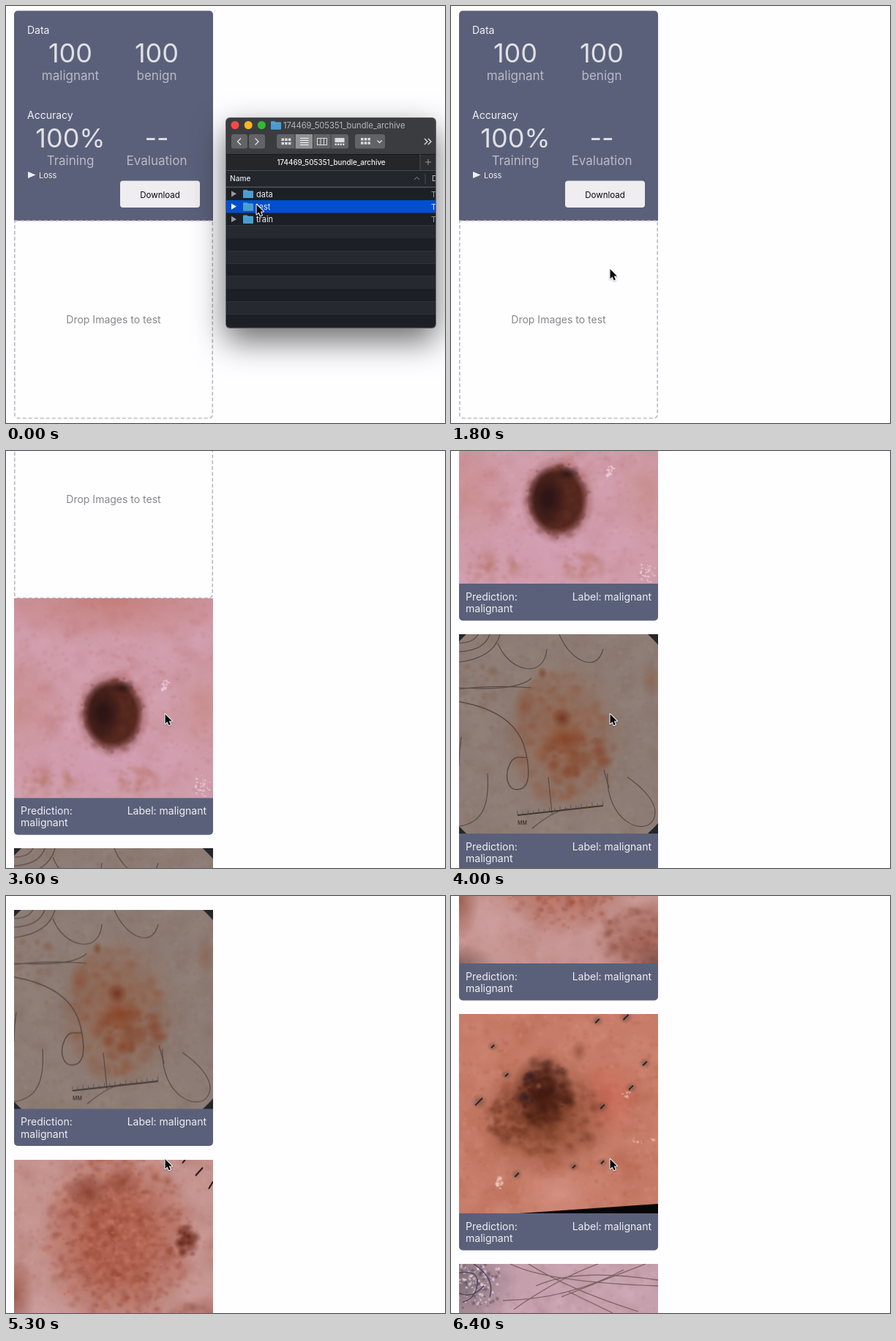
Write an HTML page with a canvas that moves like this. It is 600x569 px and loops after 6.5 s.

```html
<!DOCTYPE html>
<html lang="en">
<head>
<meta charset="utf-8">
<title>Image classifier</title>
<style>
html, body { margin: 0; width: 100%; height: 100%; overflow: hidden; background: #fefdff; }
canvas { display: block; }
</style>
</head>
<body>
<canvas id="stage" width="600" height="569"></canvas>
<script>
const LOOP = 6500, STEP = 100;
const LEFT = 11, WIDTH = 272, FIRST_CARD = 563, CARD_PITCH = 341;
const SLATE = '#5b607a';
const stage = document.getElementById('stage').getContext('2d');

let g = stage;   // current drawing context

function box(x, y, w, h, fill, radius = 0) {
  g.fillStyle = fill;
  g.beginPath();
  g.roundRect(x, y, w, h, radius);
  g.fill();
}

function shape(points, fill) {
  g.fillStyle = fill;
  g.beginPath();
  points.forEach(([x, y]) => g.lineTo(x, y));
  g.closePath();
  g.fill();
}

function line(points, color, width = 1) {
  g.strokeStyle = color;
  g.lineWidth = width;
  g.beginPath();
  points.forEach(([x, y]) => g.lineTo(x, y));
  g.stroke();
}

function text(str, x, y, size, color, align = 'left', weight = 400) {
  g.font = `${weight} ${size}px Inter, sans-serif`;
  g.textAlign = align;
  g.fillStyle = color;
  g.fillText(str, x, y);
}

/* ---------- skin pictures ---------- */

function seeded(seed) {
  seed *= 7919;
  return () => (seed = (seed * 16807) % 2147483647) / 2147483647;
}

// Soft ellipse; rgb is "r,g,b", core is the solid share of the radius.
function blob(x, y, rx, ry, rgb, alpha = 1, core = 0) {
  const fade = g.createRadialGradient(0, 0, core, 0, 0, 1);
  fade.addColorStop(0, `rgba(${rgb},${alpha})`);
  fade.addColorStop(1, `rgba(${rgb},0)`);
  g.save();
  g.translate(x, y);
  g.scale(rx, ry);
  g.fillStyle = fade;
  g.fillRect(-1, -1, 2, 2);
  g.restore();
}

// Random soft spots inside an ellipse, denser towards its middle.
function mottle(seed, count, x, y, rx, ry, size, rgb, alpha) {
  const rnd = seeded(seed);
  for (let i = 0; i < count; i++) {
    const a = rnd() * 2 * Math.PI, d = rnd() ** 0.6, r = size * (0.4 + rnd());
    blob(x + Math.cos(a) * d * rx, y + Math.sin(a) * d * ry, r, r * (0.6 + rnd() * 0.6), rgb, alpha);
  }
}

// Fine and coarse texture over the whole picture.
function skin(seed, base, dark, light) {
  box(0, 0, WIDTH, WIDTH, base);
  mottle(seed, 130, 136, 136, 195, 195, 18, dark, 0.22);
  mottle(seed + 1, 130, 136, 136, 195, 195, 18, light, 0.24);
  mottle(seed + 2, 500, 136, 136, 195, 195, 4.5, dark, 0.25);
  mottle(seed + 3, 500, 136, 136, 195, 195, 4.5, light, 0.25);
}

function hair(path, color, width = 1.2) {
  g.strokeStyle = color;
  g.lineWidth = width;
  g.stroke(new Path2D(path));
}

function pinkMole() {
  skin(1, '#d09caa', '190,120,122', '218,170,192');
  blob(136, 0, 200, 65, '194,120,112', 0.8);
  blob(10, 150, 60, 80, '196,136,128', 0.6);
  blob(262, 150, 50, 70, '196,136,126', 0.6);
  blob(130, 225, 130, 50, '210,156,182', 0.5);
  mottle(5, 30, 44, 250, 38, 18, 9, '176,108,84', 0.25);
  mottle(6, 30, 168, 247, 30, 18, 9, '176,108,84', 0.25);
  blob(135, 158, 52, 61, '130,62,56', 0.75, 0.5);
  blob(135, 158, 42, 50, '82,38,30', 1, 0.75);
  mottle(3, 110, 135, 158, 44, 53, 7, '100,46,32', 0.35);
  blob(121, 156, 28, 44, '40,18,20', 0.85, 0.2);
  blob(148, 122, 17, 10, '42,20,18', 0.8);
  mottle(8, 10, 207, 119, 6, 9, 3, '250,225,238', 0.8);
  mottle(4, 34, 257, 256, 14, 15, 2.2, '240,214,228', 0.8);
}

function hairyPatch() {
  skin(10, '#8d7c75', '128,104,94', '152,138,128');
  blob(144, 140, 86, 112, '146,90,62', 0.75);
  mottle(17, 150, 138, 140, 66, 88, 11, '140,74,44', 0.2);
  mottle(18, 50, 165, 165, 52, 27, 11, '130,58,30', 0.26);
  blob(141, 115, 15, 15, '112,48,26', 0.85);
  blob(114, 53, 7, 9, '125,62,36', 0.7);
  blob(89, 95, 15, 25, '138,72,42', 0.55);
  blob(262, 62, 14, 26, '138,85,58', 0.5);
  mottle(19, 28, 25, 72, 38, 34, 8, '130,88,66', 0.25);
  const strand = '#574a45';
  hair('M0 92C45 100 82 120 91 160S92 212 79 212S62 193 69 178S84 170 93 168', strand, 1.5);
  hair('M53 12C68 52 117 62 120 20M137 0C150 34 188 56 197 20', strand);
  hair('M0 75Q45 69 99 73M0 73Q80 78 99 60M0 38Q48 32 56 0M0 24Q35 22 42 0M0 12Q20 12 26 0', strand);
  hair('M203 190C200 255 252 276 265 254S245 205 230 195M39 190C42 240 28 258 0 262', strand);
  hair('M122 195L127 245M198 185L205 210M3 140Q0 160 0 180M100 265Q130 240 150 238', strand);
  line([[80, 247], [197, 234]], '#403836', 1.8);
  for (let i = 0; i <= 16; i++) {
    const x = 80 + i * 7.3, y = 247 - i * 0.81;
    line([[x, y], [x - 0.5, y - (i % 2 ? 4 : 6)]], '#57504c', 0.8);
  }
  text('MM', 80, 260, 7, '#403836', 'left', 600);
  g.fillStyle = '#24262a';
  g.beginPath();
  g.rect(0, 0, 272, 272);
  g.arc(134, 136, 184, 0, 2 * Math.PI, true);
  g.fill('evenodd');
}

function redPatch() {
  skin(20, '#c4938e', '176,108,98', '212,164,164');
  blob(40, 215, 75, 70, '208,162,164', 0.6);
  blob(150, 250, 70, 40, '204,154,156', 0.6);
  blob(142, 108, 112, 128, '172,88,68', 0.85, 0.35);
  mottle(24, 420, 142, 108, 100, 116, 7, '140,58,38', 0.26);
  mottle(25, 420, 142, 108, 100, 116, 5.5, '206,130,108', 0.32);
  blob(100, 44, 30, 28, '116,42,24', 0.6);
  blob(146, 30, 26, 22, '128,48,28', 0.5);
  mottle(26, 30, 236, 113, 12, 22, 8, '96,32,16', 0.4);
  blob(0, 185, 28, 55, '140,70,50', 0.7);
  blob(255, 245, 75, 60, '146,78,60', 0.7);
  mottle(27, 70, 244, 235, 55, 45, 8, '130,64,46', 0.25);
  blob(0, 272, 50, 28, '80,46,40', 0.5);
  blob(272, 272, 40, 28, '80,46,40', 0.5);
  hair('M234 0L230 5M258 11L248 22M272 30L266 40', '#1c1415', 2);
}

function brownPatch() {
  skin(30, '#c67c68', '176,94,70', '216,148,130');
  blob(205, 112, 45, 58, '216,92,78', 0.45);
  blob(134, 245, 55, 42, '218,152,142', 0.65);
  blob(118, 140, 100, 88, '134,68,42', 0.85, 0.1);
  mottle(34, 190, 118, 140, 78, 56, 9, '106,48,26', 0.24);
  mottle(35, 90, 70, 145, 32, 32, 7, '104,46,26', 0.24);
  mottle(36, 90, 125, 155, 75, 45, 6, '176,100,70', 0.25);
  blob(114, 110, 44, 58, '68,26,16', 0.95, 0.1);
  mottle(37, 90, 116, 106, 40, 44, 8, '60,22,14', 0.35);
  mottle(38, 5, 98, 100, 14, 24, 7, '38,32,48', 0.6);
  blob(109, 98, 5, 5, '170,104,90', 0.6);
  blob(164, 51, 12, 16, '130,68,44', 0.6);
  mottle(39, 10, 56, 230, 7, 8, 3.5, '246,218,206', 0.8);
  mottle(40, 8, 231, 108, 8, 8, 2.5, '244,212,200', 0.7);
  mottle(41, 12, 250, 172, 18, 5, 2.5, '244,212,200', 0.6);
  const stubs = [[27, 119, 7], [65, 83, 3], [46, 44, 3], [189, 9, 4], [228, 4, 5], [254, 67, 4],
    [235, 100, 4], [196, 126, 4], [157, 208, 3], [79, 219, 4], [196, 202, 3]];
  for (const [x, y, r] of stubs) {
    blob(x, y, r + 5, r + 4, '84,66,58', 0.5);
    line([[x - r * 0.7, y + r * 0.8], [x + r * 0.7, y - r * 0.6]], '#2a2224', 2);
  }
  shape([[82, 272], [272, 259], [272, 272]], '#080608');
}

function hairyPink() {
  skin(50, '#c59fac', '172,122,138', '216,182,196');
  blob(0, 25, 80, 70, '120,106,114', 0.9);
  mottle(54, 130, 18, 25, 42, 44, 2.4, '236,226,236', 0.8);
  mottle(55, 60, 18, 25, 42, 44, 3, '76,62,84', 0.6);
  hair('M0 12Q28 8 25 28T5 52M20 0Q50 20 42 45M0 40Q18 48 34 30', '#50415c', 1.4);
  hair('M70 0Q120 25 272 30M95 0Q150 35 245 65M60 50Q150 48 225 8M105 30Q160 5 272 22M75 62Q135 20 190 0M140 45Q190 25 255 0M150 38L210 67', '#7c6060', 1.3);
}

const photos = [pinkMole, hairyPatch, redPatch, brownPatch, hairyPink].map(paint => {
  const canvas = document.createElement('canvas');
  canvas.width = canvas.height = WIDTH;
  g = canvas.getContext('2d');
  paint();
  return canvas;
});
g = stage;

/* ---------- web page ---------- */

function panel(evaluation) {
  box(LEFT, 6.5, WIDTH, 286.5, SLATE, [5, 5, 0, 0]);
  const pair = (left, right, y, size, color) => {
    text(left, 88, y, size, color, 'center');
    text(right, 206, y, size, color, 'center');
  };
  text('Data', 29, 38, 14, '#f0f0f4');
  pair('100', '100', 76.5, 36, '#e0e0e6');
  pair('malignant', 'benign', 100.5, 17, '#b8bac6');
  text('Accuracy', 29, 154, 14, '#f0f0f4');
  pair('100%', evaluation, 193, 36, '#e0e0e6');
  pair('Training', 'Evaluation', 216.5, 17, '#b8bac6');
  shape([[30, 226], [40.5, 230.5], [30, 235]], '#eeeef2');
  text('Loss', 45, 234.5, 11, '#eeeef2');
  box(156, 238.5, 109, 36.5, '#efedf0', 4);
  text('Download', 210.5, 261.5, 11.5, '#08080a', 'center');
}

function dropZone() {
  g.save();
  g.setLineDash([5, 3]);
  g.strokeStyle = '#bdbcc1';
  g.lineWidth = 1.7;
  g.beginPath();
  g.roundRect(LEFT + 0.8, 293, WIDTH - 1.6, 269.5, [0, 0, 5, 5]);
  g.stroke();
  g.restore();
  text('Drop Images to test', 147, 433, 14, '#87868a', 'center');
}

function card(photo, y) {
  const bar = y + WIDTH;
  g.drawImage(photo, LEFT, y);
  box(LEFT, bar, WIDTH, 50.5, SLATE, [0, 0, 5, 5]);
  text('Prediction:', 20, bar + 22.5, 14, '#eeeef2');
  text('malignant', 20, bar + 39, 14, '#eeeef2');
  text('Label: malignant', 274, bar + 22.5, 14, '#eeeef2', 'right');
}

/* ---------- file window ---------- */

function folder(x, y, w = 14) {
  box(x, y, w * 0.45, 4, '#3d8fc4', 1);
  box(x, y + 1.5, w, w * 0.7, '#54a9dc', 1);
  box(x, y + 3, w, w * 0.6, '#4a9dd0', 1);
}

function toolbar() {
  const ink = '#dcdcde', button = '#626366';
  const tiles = (x, y) => {
    for (let i = 0; i < 6; i++) box(x + (i % 3) * 4.7, y + Math.floor(i / 3) * 5.2, 3.5, 3.6, ink, 0.5);
  };
  ['#fc4944', '#fdb424', '#2fbd30'].forEach((color, i) => box(307.5 + i * 18.2, 157, 11, 11, color, 5.5));
  folder(362, 157);
  text('174469_505351_bundle_archive', 379, 166.5, 11.2, '#b9b9bb');
  [[308, 22], [332, 22], [370, 98], [477, 41]].forEach(([x, w]) => box(x, 175, w, 19.5, button, 3));
  line([[321, 180.5], [316.5, 185], [321, 189.5]], ink, 1.4);
  line([[340.5, 180.5], [345, 185], [340.5, 189.5]], ink, 1.4);
  box(395.5, 175, 24, 19.5, '#929395');
  [395, 419.5, 444].forEach(x => line([[x, 175], [x, 194.5]], '#3c3d40'));
  tiles(376.5, 180.5);
  for (let i = 0; i < 4; i++) line([[402, 180.5 + i * 3], [413.5, 180.5 + i * 3]], '#f5f5f6');
  g.strokeStyle = ink;
  g.strokeRect(425.5, 180.5, 13, 9);
  [430, 434.5].forEach(x => line([[x, 180.5], [x, 189.5]], ink));
  box(449.5, 180, 13, 6, ink, 0.5);
  for (let i = 0; i < 4; i++) box(449.5 + i * 3.5, 187.5, 2.4, 2.5, ink);
  tiles(485, 180);
  line([[507.5, 183.5], [510.5, 186.5], [513.5, 183.5]], ink, 1.4);
  [572, 577].forEach(x => line([[x, 181], [x + 4, 185], [x, 189]], ink, 1.4));
}

function fileWindow() {
  g.save();
  g.shadowColor = 'rgba(0,0,0,.58)';
  g.shadowBlur = 44;
  g.shadowOffsetY = 17;
  box(300, 152, 288, 288, '#606164', 6);
  g.restore();

  g.save();
  g.beginPath();
  g.roundRect(301, 153, 286, 286, 5);
  g.clip();
  box(301, 153, 286, 49, '#3b3c40');
  toolbar();
  box(301, 202, 265, 22, '#25262a');
  box(566, 202, 21, 22, '#2d2e32');
  line([[301, 202.5], [587, 202.5]], '#17181a');
  line([[566, 202], [566, 224]], '#4a4b4e');
  line([[573, 213], [581, 213]], '#9b9b9e');
  line([[577, 209], [577, 217]], '#9b9b9e');
  text('174469_505351_bundle_archive', 444.5, 216.5, 9.8, '#f0f0f2', 'center', 500);

  box(301, 224, 286, 23, '#23272d');
  line([[301, 224.5], [587, 224.5]], '#4a4b4e');
  line([[301, 246.5], [587, 246.5]], '#3b3f45');
  text('Name', 306, 239, 10.2, '#e4e4e6', 'left', 500);
  line([[558, 237], [561.5, 233.5], [565, 237]], '#8f9195');
  line([[573, 229], [573, 243]], '#484c52');
  text('D', 582, 239, 10.2, '#c8c8ca');

  const row = 17.3, names = ['data', 'test', 'train'];
  for (let i = 0; i < 12; i++) {
    const y = 247.7 + i * row, selected = i === 1;
    box(301, y, 286, row, selected ? '#004fcf' : i % 2 ? '#262a30' : '#1c2026');
    if (!names[i]) continue;
    shape([[308, y + 4.5], [315, y + 8.6], [308, y + 12.7]], selected ? '#f0f4fb' : '#96989c');
    folder(324, y + 3);
    text(names[i], 342, y + 12.8, 11, '#f0f0f2');
    text('T', 581, y + 12.8, 11, selected ? '#d6e2f8' : '#9a9ca0');
  }
  g.restore();
}

/* ---------- motion ---------- */

function cursor(x, y) {
  g.save();
  g.translate(x, y);
  const arrow = new Path2D('M0 0V13.2L3 10.4L5.1 15.3L7.4 14.3L5.3 9.5H9.4Z');
  g.shadowColor = 'rgba(0,0,0,.3)';
  g.shadowBlur = 2;
  g.shadowOffsetY = 1;
  g.lineJoin = 'round';
  g.strokeStyle = '#fff';
  g.lineWidth = 2;
  g.stroke(arrow);
  g.shadowColor = 'transparent';
  g.fillStyle = '#0a0a0c';
  g.fill(arrow);
  g.restore();
}

// A flick slows down exponentially: at time `at` there is `left` to go.
const flick = (t, limit, at, left) => limit - left * Math.exp((at - t) / 364);

function scrollAt(t) {
  const start = Math.min(Math.max(t - 3200, 0), 100) * 0.135;
  return Math.max(start, flick(t, 800, 4000, 146), flick(t, 1452.6, 5800, 143.6));
}

function draw(t) {
  const tested = t >= 2500;
  box(0, 0, 600, 569, '#fefdff');

  g.save();
  g.translate(0, -scrollAt(t));
  panel(tested ? '100%' : '--');
  dropZone();
  if (tested) photos.forEach((photo, i) => card(photo, FIRST_CARD + i * CARD_PITCH));
  g.restore();

  if (t < 1600) fileWindow();

  const p = Math.min(Math.max((t - 100) / 1100, 0), 1);
  const ease = p * p * (3 - 2 * p);
  const x = 342.5 - 125 * ease, y = 271 + 88 * ease;
  if (p > 0 && p < 1) {
    g.save();
    g.globalAlpha = 0.6;
    folder(x - 18.5, y - 4);
    text('test', x - 0.5, y + 6, 11, '#55585f');
    g.restore();
  }
  cursor(x, y);
}

function tick() {
  draw(Math.floor((performance.now() % LOOP) / STEP) * STEP);
  requestAnimationFrame(tick);
}
tick();
</script>
</body>
</html>
```
